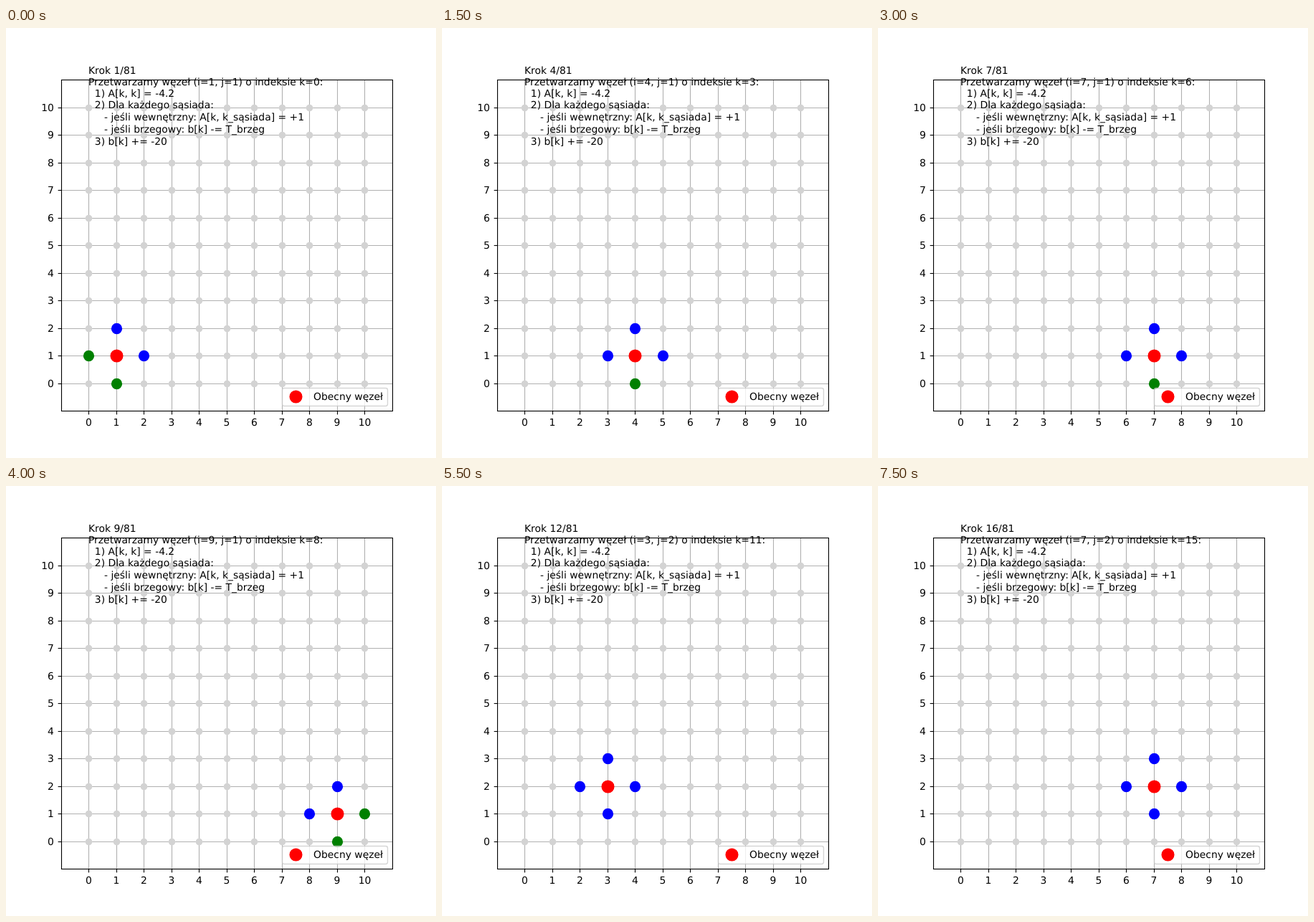
Animation of 600x600 px, one loop 8000 ms. Source, as an HTML page:

```html
<!DOCTYPE html>
<html lang="pl">
<head>
<meta charset="utf-8">
<style>
  html, body { margin: 0; width: 100%; height: 100%; overflow: hidden; background: #fff; }
  svg { display: block; width: 600px; height: 600px; }
  text { font: 13.889px "DejaVu Sans", sans-serif; white-space: pre; text-rendering: geometricPrecision; }
</style>
</head>
<body>
<svg id="stage" viewBox="0 0 600 600"></svg>
<script>
const STEP_MS = 500, STEPS = 16, LAST = 10, INNER = LAST - 1;
const LINE = 1.111;
const BOX = { left: 77.5, top: 72.5, right: 539.5, bottom: 534.5 };
const stage = document.getElementById('stage');

function add(tag, attrs, content = '') {
  const node = document.createElementNS('http://www.w3.org/2000/svg', tag);
  set(node, attrs);
  node.textContent = content;
  return stage.appendChild(node);
}
function set(node, attrs) {
  for (const key in attrs) node.setAttribute(key, attrs[key]);
}

// Grid positions snap to pixel centres.
const snap = v => Math.floor(v + 0.5) + 0.5;
const px = i => snap(115 + 38.5 * i);
const py = j => snap(495.5 - 38.5 * j);
const line = (x1, y1, x2, y2, stroke) =>
  add('line', { x1, y1, x2, y2, stroke, 'stroke-width': LINE });
const dot = (cx, cy, r, fill) => add('circle', { cx, cy, r, fill });

for (let n = 0; n <= LAST; n++) {
  const x = px(n), y = py(n);
  line(x, BOX.top, x, BOX.bottom, '#b0b0b0');
  line(BOX.left, y, BOX.right, y, '#b0b0b0');
}
for (let n = 0; n <= LAST; n++) {
  const x = px(n), y = py(n);
  line(x, BOX.bottom, x, 539.4, '#000');
  line(BOX.left, y, 72.6, y, '#000');
  add('text', { x: 115.5 + 38.5 * n, y: 555, 'text-anchor': 'middle' }, n);
  add('text', { x: 66.8, y: y + 4.5, 'text-anchor': 'end' }, n);
}
for (let j = 0; j <= LAST; j++)
  for (let i = 0; i <= LAST; i++) dot(px(i), py(j), 4.86, '#d3d3d3');

const offsets = [[-1, 0], [1, 0], [0, -1], [0, 1]];
const neighbours = offsets.map(() => dot(0, 0, 7.64, 'blue'));
const current = dot(0, 0, 9.03, 'red');

add('rect', {
  x: BOX.left, y: BOX.top, width: BOX.right - BOX.left, height: BOX.bottom - BOX.top,
  fill: 'none', stroke: '#000', 'stroke-width': LINE
});

const label = (y, content) => add('text', { x: 115, y }, content);
const title = label(64);
const detail = label(80);
label(96, '  1) A[k, k] = -4.2');
label(112, '  2) Dla każdego sąsiada:');
label(129, '     - jeśli wewnętrzny: A[k, k_sąsiada] = +1');
label(146, '     - jeśli brzegowy: b[k] -= T_brzeg');
label(163, '  3) b[k] += -20');

add('rect', {
  x: 385.5, y: 502.5, width: 147, height: 25, rx: 2.78,
  fill: '#fff', stroke: '#ccc', 'stroke-width': 1.389, opacity: 0.8
});
dot(404.5, 514.5, 9.03, 'red');
add('text', { x: 429, y: 519 }, 'Obecny węzeł');

const onEdge = n => n === 0 || n === LAST;

function render(ms) {
  const k = Math.floor(ms / STEP_MS) % STEPS;
  const i = k % INNER + 1, j = Math.floor(k / INNER) + 1;
  title.textContent = `Krok ${k + 1}/${INNER * INNER}`;
  detail.textContent = `Przetwarzamy węzeł (i=${i}, j=${j}) o indeksie k=${k}:`;
  set(current, { cx: px(i), cy: py(j) });
  offsets.forEach(([dx, dy], n) => {
    const a = i + dx, b = j + dy;
    set(neighbours[n], { cx: px(a), cy: py(b), fill: onEdge(a) || onEdge(b) ? 'green' : 'blue' });
  });
}

const start = performance.now();
function tick() {
  render(performance.now() - start);
  requestAnimationFrame(tick);
}
tick();
</script>
</body>
</html>
```
